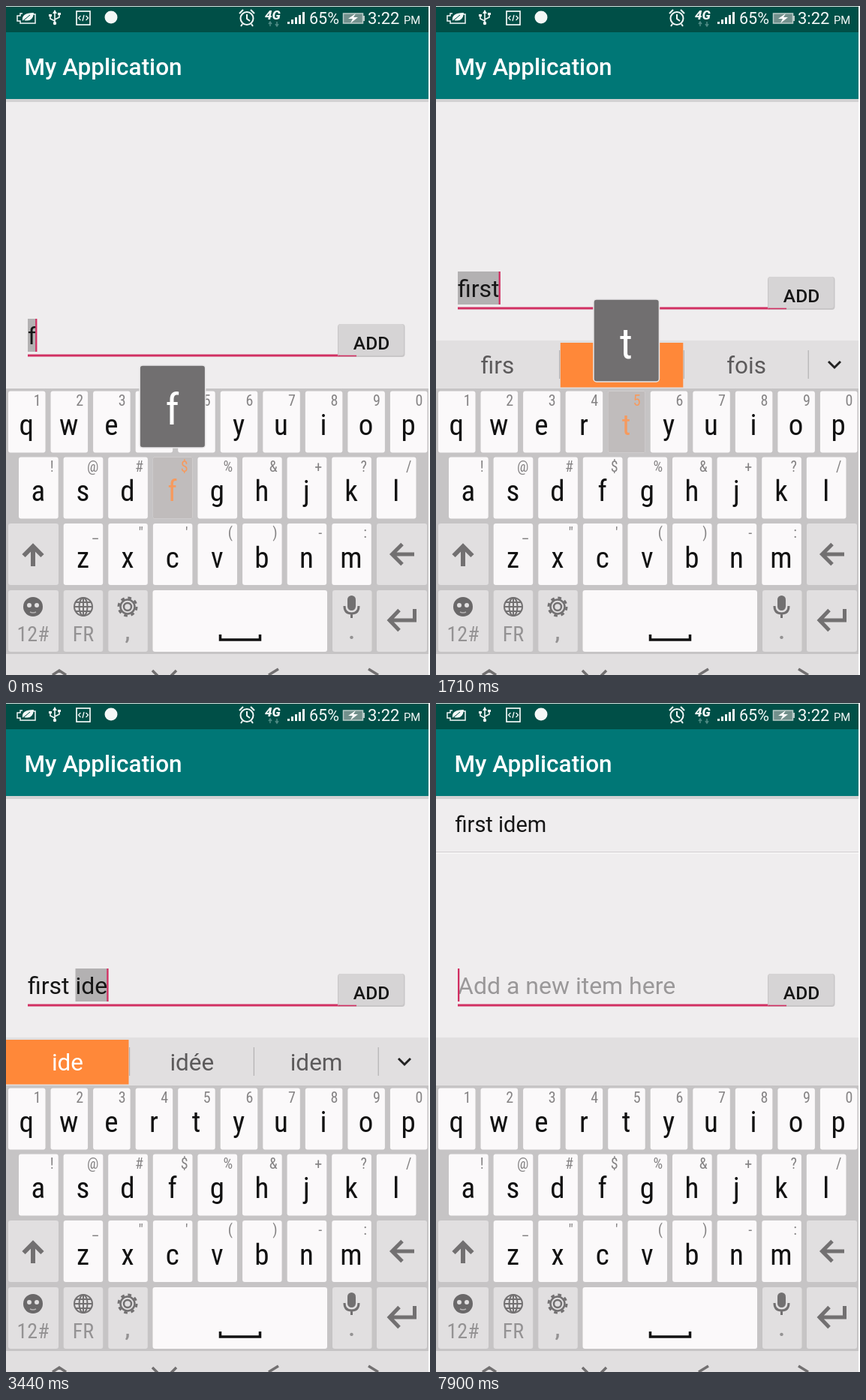
Animation, 565 px wide and 892 px high, one loop 8 s. Source, as an HTML page:

```html
<!DOCTYPE html>
<html lang="en">
<head>
<meta charset="utf-8">
<title>My Application</title>
<style>
html, body { margin: 0; width: 100%; height: 100%; overflow: hidden; background: #fff; }
svg { display: block; width: 565px; height: 892px; }
text { font-family: Roboto, sans-serif; white-space: pre; }
.narrow { font-family: "Roboto Condensed", Roboto, sans-serif; font-stretch: condensed; }
.mid { text-anchor: middle; }
.end { text-anchor: end; }
.medium { font-weight: 500; }
.line { fill: none; stroke: #727071; }
.white { fill: none; stroke: #f4f8f7; stroke-width: 2; }
</style>
</head>
<body>
<svg viewBox="0 0 565 892">
  <rect width="563" height="892" fill="#efedee"/>
  <g id="content"></g>

  <!-- app bar -->
  <rect y="124" width="563" height="4" fill="#c9c9c9" opacity=".75"/>
  <rect y="35" width="563" height="89" fill="#007776"/>
  <text x="24.5" y="92" font-size="31.5" class="medium" fill="#fff">My Application</text>

  <!-- status bar -->
  <rect width="563" height="35" fill="#004f47"/>
  <rect width="565" height="1" fill="#d5dfdd"/>
  <g class="white">
    <path d="M22 10h-3v3h-4v7h4v3h20v-12h-3" stroke-width="1.5"/>
    <path d="M22 20q-2-11 15-11q-1 13-13 10q4-5 9-7" fill="#f4f8f7" stroke="none"/>
    <path d="M20 22L32 12" stroke="#004f47" stroke-width="1"/>
    <path d="M65 8V23M65 20l-6-3v-4M65 18l6-3v-4" stroke-width="1.6"/>
    <path d="M62 10l3-5 3 5zM57 11h4v3h-4zM69 9h4v3h-4z" fill="#f4f8f7" stroke="none"/>
    <circle cx="65" cy="23" r="2.2" fill="#f4f8f7" stroke="none"/>
    <rect x="94" y="7" width="18" height="18" stroke-width="1.7"/>
    <path d="M99.500 13l-3 3 3 3M106.500 13l3 3-3 3M104 12l-2 8" stroke-width="1.3"/>
    <circle cx="140" cy="15" r="8.500" fill="#f4f8f7" stroke="none"/>
    <circle cx="321" cy="16.500" r="8.500"/>
    <path d="M321 11v6l4 3M311 10l5-5M331 10l-5-5M315 24l-2 3M327 24l2 3"/>
    <rect x="449.500" y="10" width="26" height="13" fill="#73908c" stroke="#b9cbc8" stroke-width="1.5"/>
    <path d="M477 13v7" stroke="#b9cbc8"/>
    <path d="M466 10l-10 7h6l-3 6 10-8h-6z" fill="#fff" stroke="none"/>
  </g>
  <path d="M352 27v-6m-2 3l2-3 2 3M361 21v6m-2-3l2 3 2-3" fill="none" stroke="#4e8a84" stroke-width="1.5"/>
  <path d="M375 24v-3h3v3zM380 24v-6h3v6zM385 24v-9h3v9zM390 24v-12h3v12zM395 24V8h3v16z" fill="#f4f8f7"/>
  <g fill="#f4f8f7">
    <text x="345" y="18" font-size="17" font-weight="900" font-style="italic">4G</text>
    <text x="404" y="24" font-size="21.500">65%</text>
    <text x="482" y="24" font-size="22">3:22</text>
    <text x="530" y="24" font-size="14.800">PM</text>
  </g>

  <!-- keyboard -->
  <rect y="510" width="563" height="354" fill="#c6c4c5"/>
  <rect y="864" width="563" height="28" fill="#e1dfe0"/>
  <g id="keys"></g>
  <g class="line" stroke-width="6">
    <path d="M36 747V721M23.500 733L36 720.500 48.500 733"/>
    <path d="M544 731H515M528 717.500L514.500 731 528 744.500" stroke-width="5"/>
    <path d="M544.500 804V819H512M524 805.500L511 819 524 832.500" stroke-width="5"/>
  </g>
  <circle cx="36" cy="801" r="13" fill="#6a6869"/>
  <path d="M28 799a3 3 0 0 1 6 0a3 3 0 0 1-6 0M38 799a3 3 0 0 1 6 0a3 3 0 0 1-6 0" fill="#e1dfe0"/>
  <path d="M32 808q4 2 8 0" fill="none" stroke="#b5b3b4" stroke-width="1.500"/>
  <g class="line" stroke-width="2">
    <circle cx="103" cy="801" r="12"/>
    <ellipse cx="103" cy="801" rx="5.500" ry="12"/>
    <path d="M103 789v24M91 801h24M93 795h20M93 807h20"/>
    <circle cx="162" cy="801" r="9.500" stroke-width="2.500"/>
    <circle cx="162" cy="801" r="12" stroke-width="3" stroke-dasharray="4.700 4.725"/>
    <circle cx="162" cy="801" r="5" stroke-width="2.500"/>
    <path d="M451 800q0 10 9.500 10t9.500-10M460.500 810v6" stroke-width="3"/>
  </g>
  <rect x="455" y="786" width="11" height="20" rx="5.500" fill="#727071"/>
  <g class="narrow mid" font-size="28" fill="#949293">
    <text x="36" y="847" class="narrow">12#</text>
    <text x="103" y="847" class="narrow">FR</text>
    <text x="162" y="844" class="narrow" font-weight="700">,</text>
    <text x="460.500" y="844" class="narrow" font-weight="700">.</text>
  </g>
  <path d="M285.500 838v7h53v-7" fill="none" stroke="#111" stroke-width="3.500"/>
  <path d="M62 892l9-6 9 6M195 886l7 7M227 886l-7 7M363 884l-13 8M483 884l13 8" class="line" stroke-width="3.500"/>

  <g id="overlay"></g>
  <rect x="563" width="2" height="892" fill="#fff"/>
</svg>

<script>
const LOOP = 8000, PINK = '#d12f62', ORANGE = '#ff8839';
const $ = id => document.getElementById(id);
const ctx = document.createElement('canvas').getContext('2d');
ctx.font = '32px Roboto, sans-serif';
const widthOf = s => ctx.measureText(s).width;

const rect = (x, y, w, h, fill, more = '') =>
  `<rect x="${x}" y="${y}" width="${w}" height="${h}" fill="${fill}" ${more}/>`;
const label = (s, x, y, size, fill, cls = '') =>
  `<text x="${x}" y="${y}" font-size="${size}" fill="${fill}" class="${cls}">${s.replace('&', '&amp;')}</text>`;

// Letter rows: letters, hints, first x, pitch, key width, top
const keys = {};
[['qwertyuiop', '1234567890', 3, 56.55, 49.5, 513.5],
 ['asdfghjkl', '!@#$%&+?/', 17, 59.6, 52.7, 601.5],
 ['zxcvbnm', '_"\'()-:', 76.7, 59.6, 52.5, 690]
].forEach(([letters, hints, x, pitch, w, y]) => [...letters].forEach((c, i) => {
  keys[c] = { c, hint: hints[i], x: x + pitch * i, y, w };
}));

function drawKey({ c, hint, x, y, w }, pressed) {
  const [bg, ink, dim] = pressed ? ['#c0bcbc', '#f69a5e', '#f69a5e'] : ['#fbf9fa', '#111', '#858384'];
  return rect(x, y, w, 82, bg, 'rx="3"')
    + label(c, x + w / 2 - .5, y + 58.5, 39, ink, 'narrow mid')
    + label(hint, x + w - 6, y + 19, 20, dim, 'narrow end');
}

function drawPreview({ c, x, y, w }) {
  const mid = x + w / 2;
  return rect(mid - 44, y - 122.5, 87.5, 110, '#716f70', 'rx="4" stroke="#e8e6e7" stroke-width="1.5"')
    + label(c, mid - .5, y - 44, 58, '#fff', 'narrow mid');
}

function drawBar({ words, hot }) {
  let out = rect(0, 446, 563, 64, '#e1dfe0');
  if (words.length === 1)
    return out + rect(186, 459, 1.5, 40, '#bebcbd') + rect(0, 449, 186, 59.5, ORANGE)
      + label(words[0], 93, 489.5, 31.5, '#fff', 'mid');
  words.forEach((word, i) => {
    const x = i * 165.8;
    out += rect(x + 164, 459, 1.2, 38, '#b4b2b3');
    if (i === hot) out += rect(x, 449, 163.5, 59.5, ORANGE);
    out += label(word, x + 82, 489.5, 31.5, i === hot ? '#fff' : '#5c5a5b', 'mid');
  });
  if (words.length) out += '<path d="M523 474l8 8 8-8" fill="none" stroke="#222" stroke-width="3"/>';
  return out;
}

function drawInput(s) {
  const start = 29 + widthOf(s.text), end = start + widthOf(s.word);
  let out = '';
  if (s.word) out += rect(start, 354, end - start, 44, '#b3b1b2');
  out += s.text + s.word
    ? label(s.text + s.word, 29, 388, 32, '#161616')
    : label('Add a new item here', 29, 388, 32, '#9a9899');
  if (s.cursor) out += rect(end - (end > 30 ? 1 : 0), 354, 2.3, 44, PINK);
  out += rect(29, 401.5, 438, 3, PINK)
    + rect(442, 361, 89.5, 44, '#c8c6c7', 'rx="4"')
    + rect(443, 361, 87, 42, s.press ? '#bdbbbc' : '#d6d4d5', 'rx="3"')
    + rect(443, 402.7, 24, 1.6, PINK)
    + label('ADD', 487, 394.5, 24.5, '#161616', 'mid medium');
  return `<g transform="translate(0 ${s.words ? 0 : 63})">${out}</g>`;
}

const drawItem = () => label('first idem', 25.5, 172, 29, '#161616')
  + rect(0, 198, 563, 1.5, '#d6d4d5') + rect(0, 199.5, 563, 1.5, '#f9f8f8');

const drawBubble = alpha => `<g opacity="${alpha}">`
  + rect(14, 360, 506, 90, '#c9c7c8', 'rx="12" opacity=".25"')
  + rect(22, 363, 490, 76, '#b5b3b4', 'rx="9" opacity=".4"')
  + rect(27, 365, 481, 68, '#cac8c9', 'rx="6"')
  + '<path d="M78 433h28l-14 13z" fill="#cac8c9"/></g>'
  + label('Appuyez pour ajouter au dictionnaire', 267.5, 408, 30, '#222', 'narrow mid');

const drawToast = alpha => `<g opacity="${alpha}">`
  + rect(157, 752, 250, 75, '#656364', 'rx="37"')
  + label('Item add to list', 282, 800, 29, '#f0eeee', 'narrow mid') + '</g>';

// Each step changes the state from its time on
const steps = [
  [0, { text: '', word: 'f', cursor: 1, words: null, hot: 0, key: 'f', preview: 1 }],
  [130, { preview: 0 }],
  [280, { key: '', words: ['f', 'fait', 'faire'] }],
  [430, { word: 'fi', key: 'i', preview: 1 }],
  [580, { key: '', words: ['fi', 'di', 'fin'], hot: 1 }],
  [730, { word: 'fir', key: 'r' }],
  [880, { key: '', words: ['fir', 'dit', 'for'] }],
  [1030, { word: 'firs', key: 's', preview: 0 }],
  [1290, { key: '' }],
  [1430, { words: ['firs', 'dits', 'fois'] }],
  [1710, { word: 'first', key: 't', preview: 1 }],
  [1860, { key: '', words: ['first', 'dirait', 'forts'] }],
  [2160, { text: 'first', word: '', words: ['first'], bubble: .9 }],
  [2300, { text: 'first ', bubble: 1 }],
  [2440, { bubble: 0, words: [] }],
  [2570, { word: 'i', key: 'i' }],
  [2710, { key: '', words: ['i', 'î', 'ï'], hot: 0 }],
  [2860, { word: 'id', key: 'd' }],
  [3000, { preview: 0 }],
  [3150, { key: '', words: ['id', 'idée', 'ide'] }],
  [3290, { word: 'ide', key: 'e', preview: 1 }],
  [3440, { key: '', words: ['ide', 'idée', 'idem'] }],
  [3730, { word: 'idem', key: 'm' }],
  [3880, { preview: 0 }],
  [4030, { key: '', words: ['idem', 'item', 'idée'] }],
  [4470, { cursor: 0 }],
  [4610, { press: 1 }],
  [4890, { press: 0, text: '', word: '', cursor: 1, words: [], item: 1 }],
  [5020, { toast: .85 }],
  [5620, { toast: 1 }],
  [6230, { cursor: 0 }],
  [6550, { cursor: 1 }],
  [7280, { cursor: 0, toast: .5 }],
  [7430, { toast: 0 }],
  [7900, { cursor: 1 }]
];
let last = {};
const states = steps.map(([, change]) => last = { ...last, ...change });

function render(s) {
  $('content').innerHTML = (s.item ? drawItem() : '') + drawInput(s);
  const key = keys[s.key];
  $('overlay').innerHTML = (s.words ? drawBar(s) : '')
    + (key ? drawKey(key, true) : '')
    + (key && s.preview ? drawPreview(key) : '')
    + (s.bubble ? drawBubble(s.bubble) : '')
    + (s.toast ? drawToast(s.toast) : '');
}

const grey = [[3, 690, 67], [494, 690, 67], [3, 779, 67], [76.7, 779, 52.5],
  [136.3, 779, 52.5], [435, 779, 52.5], [494, 779, 67]];
$('keys').innerHTML = Object.values(keys).map(k => drawKey(k)).join('')
  + grey.map(([x, y, w]) => rect(x, y, w, 82, '#e1dfe0', 'rx="3"')).join('')
  + rect(195.5, 779, 232.5, 82, '#fbf9fa', 'rx="3"');

let shown = -1;
const begin = performance.now();
function tick() {
  const t = (performance.now() - begin) % LOOP;
  const now = steps.findLastIndex(([at]) => at <= t);
  if (now !== shown) render(states[shown = now]);
  requestAnimationFrame(tick);
}
tick();
</script>
</body>
</html>
```
